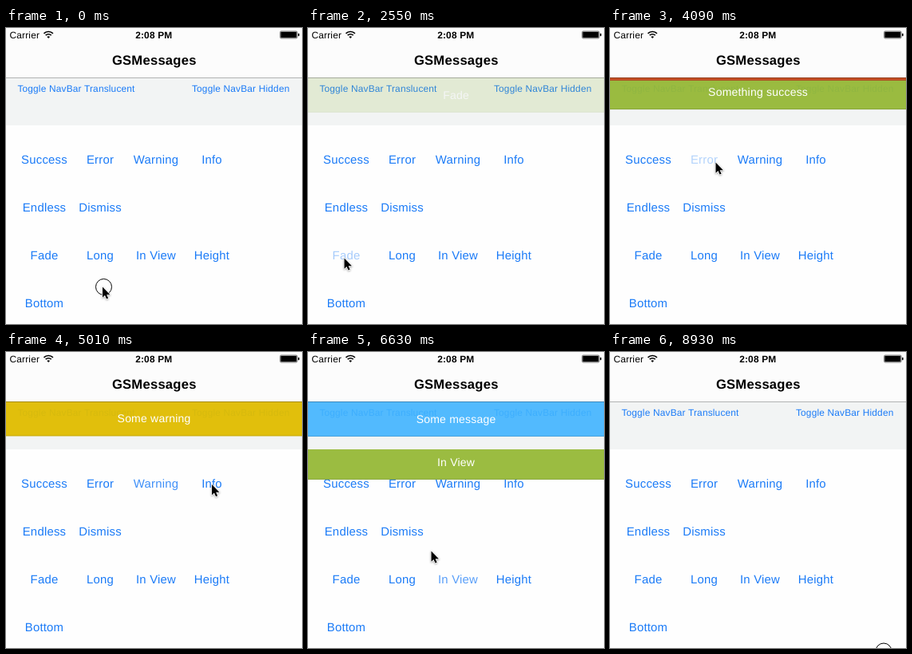
Recreate the animation shown at these times as an HTML page. Size 371 by 371 pixels, loop 8.97 s.

```html
<!DOCTYPE html>
<html lang="en">
<head>
<meta charset="utf-8">
<title>GSMessages demo</title>
<style>
  html, body { margin: 0; height: 100%; overflow: hidden; background: #fefefe; }
  svg { display: block; width: 100vw; height: 100vh; overflow: hidden; }
  text {
    font-family: "Liberation Sans", Arial, sans-serif; text-anchor: middle;
    letter-spacing: .015em; text-rendering: geometricPrecision;
  }
  .status { font-size: 11.9px; }
  .title { font-size: 16.6px; font-weight: bold; }
  .toggle { font-size: 11.9px; fill: #1b7bf7; }
  .button { font-size: 14.9px; fill: #1b7bf7; }
  .message { font-size: 14px; fill: #fff; }
</style>
</head>
<body>
<svg viewBox="0 0 371 371">
  <clipPath id="below-nav"><rect y="62" width="371" height="60"/></clipPath>
  <clipPath id="in-view"><rect y="122" width="371" height="249"/></clipPath>

  <rect width="371" height="371" fill="#fefefe"/>
  <rect y="62" width="371" height="60" fill="#f2f4f4"/>
  <text class="toggle" x="88" y="80.2">Toggle NavBar Translucent</text>
  <text class="toggle" x="294.2" y="80.2">Toggle NavBar Hidden</text>
  <g id="buttons"></g>
  <g id="top" clip-path="url(#below-nav)"></g>
  <g id="inner" clip-path="url(#in-view)"></g>

  <rect width="371" height="62" fill="#fcfcfc"/>
  <rect y="62" width="371" height="1" fill="#000" opacity=".27"/>
  <text class="title" x="185.8" y="46.2">GSMessages</text>
  <text class="status" x="23.3" y="12.7">Carrier</text>
  <text class="status" x="185.3" y="12.7" font-weight="bold">2:08 PM</text>
  <g fill="none" stroke="#000" stroke-width="1.7">
    <path d="M47.5 6.9a8 8 0 0 1 11.4 0M49.7 9.2a4.9 4.9 0 0 1 7 0"/>
    <path d="M53.2 13l-1.9-1.9a2.7 2.7 0 0 1 3.8 0z" fill="#000" stroke="none"/>
  </g>
  <rect x="343.5" y="4" width="21.6" height="9" rx="1.5" fill="none" stroke="#000" stroke-width=".5"/>
  <rect x="344.3" y="4.8" width="20" height="7.4" rx=".7"/>
  <rect x="366" y="6.8" width="1.6" height="3.4" rx=".7"/>

  <circle id="ring" r="10" fill="none" stroke="#000"/>
  <g id="cursor">
    <path d="M0 0V16L3.6 12.6 6 18.2 8.6 17.1 6.2 11.6H11.4Z" fill="#000" transform="scale(.83)"
          stroke="#fff" stroke-width="1.8" stroke-linejoin="round" paint-order="stroke"
          style="filter: drop-shadow(0 1px 1px rgba(0,0,0,.35))"/>
  </g>
</svg>
<script>
const LOOP = 8970, SLIDE = 300, HIGHLIGHT = 350, HEIGHT = 44;
const $ = id => document.getElementById(id);

const rows = [
  ["Success", "Error", "Warning", "Info"],
  ["Endless", "Dismiss"],
  ["Fade", "Long", "In View", "Height"],
  ["Bottom"]
];

// label: [touch down, touch up]
const taps = {
  Fade: [2370, 2470], Success: [3290, 3390], Error: [4000, 4035], Warning: [4725, 4730],
  Info: [5230, 5290], "In View": [6280, 6400], Dismiss: [7810, 7860]
};
const up = label => taps[label][1];

const green = "rgba(150,185,55,.95)";
const messages = [
  { text: "Fade", color: green, show: up("Fade"), hide: up("Success"), fade: true },
  { text: "Something success", color: green, show: up("Success"), hide: up("Error") },
  { text: "Something error", color: "rgba(219,36,27,.7)", show: up("Error"), hide: up("Warning") },
  { text: "Some warning", color: "rgba(225,189,0,.95)", show: up("Warning"), hide: up("Info") },
  { text: "Some message", color: "rgba(65,180,255,.9)", show: up("Info"), hide: up("Dismiss") },
  { text: "In View", color: green, show: up("In View"), hide: up("Dismiss"), inner: true }
];

// cursor moves: start, end, x, y
const moves = [
  [0, 0, 121, 324.5],
  [1470, 1960, 45.5, 288.5],
  [2600, 3230, 43, 173],
  [3500, 3950, 132.5, 168.5],
  [4180, 4550, 190, 167],
  [4730, 5010, 258, 166],
  [5500, 6100, 185, 280],
  [6330, 6910, 127, 222],
  [8100, 8670, 339.5, 373],
  [8710, 8930, 341.5, 375]
];

const clamp = v => Math.min(1, Math.max(0, v));
const ease = v => (v = clamp(v), v * v * (3 - 2 * v));

function add(parent, tag, attrs, text = "") {
  const el = document.createElementNS("http://www.w3.org/2000/svg", tag);
  for (const k in attrs) el.setAttribute(k, attrs[k]);
  el.textContent = text;
  return parent.appendChild(el);
}

const buttons = {};
rows.forEach((row, r) => row.forEach((label, c) => {
  buttons[label] = add($("buttons"), "text",
    { class: "button", x: 48 + 70 * c, y: 169.5 + 60 * r }, label);
}));

for (const m of messages) {
  m.top = m.inner ? 122 : 62;
  m.el = add($(m.inner ? "inner" : "top"), "g", {});
  add(m.el, "rect", { width: 371, height: HEIGHT, fill: m.color });
  add(m.el, "rect", { y: HEIGHT - 1, width: 371, height: 1, opacity: .13 });
  add(m.el, "text", { class: "message", x: 185.6, y: 27 }, m.text);
}

function cursorAt(t) {
  let [, , x, y] = moves[0];
  for (const [start, end, toX, toY] of moves.slice(1)) {
    const p = ease((t - start) / (end - start));
    x += (toX - x) * p;
    y += (toY - y) * p;
  }
  return [x, y];
}

function draw(t) {
  for (const label in taps) {
    const [down, release] = taps[label];
    const alpha = t < down ? 1 : .2 + .8 * clamp((t - release) / HIGHLIGHT);
    buttons[label].setAttribute("opacity", alpha);
  }
  for (const m of messages) {
    const shown = ease((t - m.show) / SLIDE) - ease((t - m.hide) / SLIDE);
    const lift = m.fade ? 0 : HEIGHT * (1 - shown);
    m.el.setAttribute("transform", `translate(0 ${m.top - lift})`);
    m.el.setAttribute("opacity", m.fade ? shown : +(shown > 0));
  }
  const at = `translate(${cursorAt(t)})`;
  $("cursor").setAttribute("transform", at);
  $("ring").setAttribute("transform", at + " translate(1.5 0)");
  $("ring").setAttribute("opacity", +(t < 60 || t >= 8730));
}

let begin;
function tick(now) {
  begin ??= now;
  draw((now - begin) % LOOP);
  requestAnimationFrame(tick);
}
draw(0);
requestAnimationFrame(tick);
</script>
</body>
</html>
```
